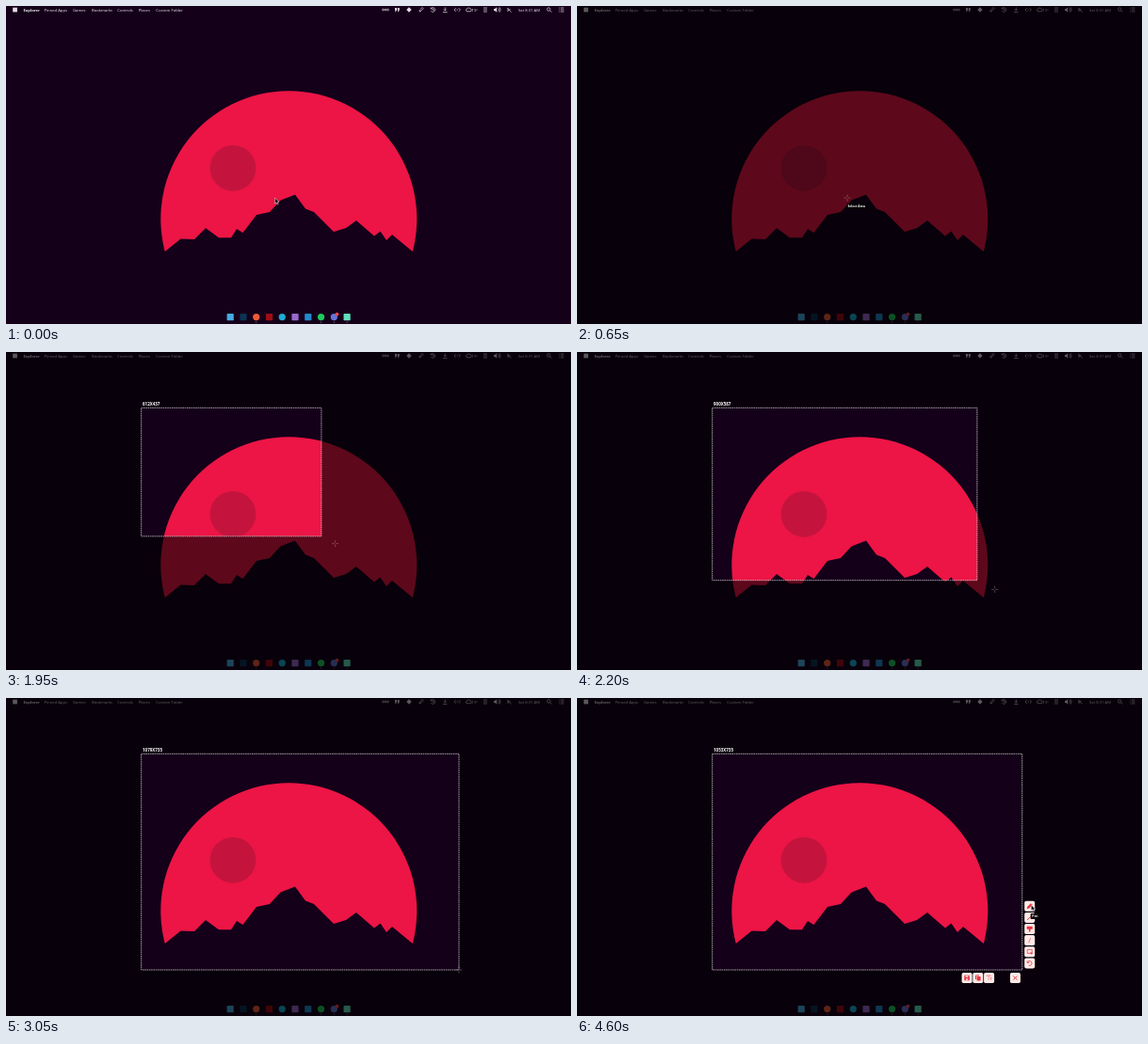
An HTML page that plays this animation: 600 by 338 pixels, repeating every 5 s.

```html
<!DOCTYPE html>
<html lang="en">
<head>
<meta charset="utf-8">
<title>Select an area</title>
<style>
html, body { margin: 0; width: 100%; height: 100%; overflow: hidden; background: #15001a; }
svg { display: block; width: 100vw; height: 100vh; }
text { font-family: "Open Sans", sans-serif; fill: #fff; }
.menu text { font-size: 4.2px; fill: #f0ecf1; }
.menu .app { font-weight: 700; }
.line { fill: none; stroke: #e4dde6; stroke-width: .7; }
.solid { fill: #e4dde6; }
.tip { font-size: 3.35px; font-weight: 700; }
.size { font-size: 4.5px; font-weight: 700; }
.tool { fill: #fdebe7; }
.ink { fill: none; stroke: #e8323f; stroke-width: 1; }
.full { fill: #e8323f; }
</style>
</head>
<body>
<svg viewBox="0 0 600 338" preserveAspectRatio="none">
  <rect width="600" height="338" fill="#15001a"/>
  <path fill="#ec1545" d="M168.8 261A136 136 0 1 1 431.8 261L410 243 404 249 397.500 239.500 391 244.500 372 228 361 236 348 240 327 219 318 215.500 307 200.500 291.500 206.500 280 219 266 222 251.500 241 245 237 239 246.300 226 246.300 212 236 200 248 185.500 247.500Z"/>
  <circle cx="241" cy="172.300" r="24.400" fill="#c4143e"/>

  <g class="menu">
    <rect class="solid" x="7.200" y="1.700" width="4.700" height="4.700"/>
    <g id="titles"></g>
    <g class="line">
      <circle cx="400.500" cy="4" r=".9"/><circle cx="403" cy="4" r=".9"/><circle cx="405.500" cy="4" r=".9"/>
      <path d="M439 6l.5-2 2.700-2.500 1 1L440.500 5.500Z"/>
      <path d="M451.500 2.700a2.300 2.300 0 1 1-.2 2.300M451.200 1.500v1.500h1.500M453.500 2.800v1.500h1.200"/>
      <path d="M466.300 1.500v3.500M464.800 3.500l1.500 1.500 1.500-1.500M464 6.500h4.600"/>
      <path d="M477.800 2.200l-1.800 1.800 1.800 1.800M480.700 2.200l1.800 1.800-1.800 1.800M478.500 4h1.500"/>
      <path d="M490 5.800a1.500 1.500 0 0 1 0-3 1.700 1.700 0 0 1 3 .2 1.400 1.400 0 0 1 0 2.800Z"/>
      <path d="M507 2h4M507 4h4M507 6h4"/>
      <path d="M522.800 2.300a2.500 2.500 0 0 1 0 3.400M524 1.300a4 4 0 0 1 0 5.400"/>
      <path d="M532.500 2l4 4.500M533 6v-3.500M535.500 3l-2 2"/>
      <circle cx="576.300" cy="3.500" r="1.700"/><path d="M577.600 4.800l1.800 1.800"/>
      <path d="M588.800 2h3.700M588.800 4h3.700M588.800 6h3.700M587.200 2h.7M587.200 4h.7M587.200 6h.7"/>
    </g>
    <path class="solid" d="M413 2h2v2.500l-1.200 1.800h-.6l.4-1.800H413ZM415.800 2h2v2.500l-1.200 1.800h-.6l.4-1.800h-.6ZM428 1.200l2.700 2.800-2.700 2.800-2.700-2.800ZM518 3h1.200l2-1.700v5.400l-2-1.700H518Z"/>
  </g>
  <g id="dock"></g>

  <path id="dim" fill="#000" fill-opacity=".6" fill-rule="evenodd"/>
  <g id="pick">
    <rect id="frame" x="143.700" y="59.300" fill="none" stroke="#d8d3da" stroke-width=".75" stroke-dasharray="1.600 .7"/>
    <text id="size" class="size" x="145" y="57"></text>
  </g>
  <g id="tools"></g>
  <g id="cross">
    <path d="M-3.500 0h2.700M.8 0h2.700M0-3.500v2.700M0 .8v2.700" fill="none" stroke="#b09ca6" stroke-width=".7" opacity=".6"/>
    <g id="hint">
      <rect x="-.3" y="6" width="19.800" height="5" fill="#000"/>
      <text class="tip" x=".5" y="9.800">Select Area</text>
    </g>
  </g>
  <g id="penTip">
    <rect x="481.700" y="229" width="9.300" height="6" rx=".6" fill="#0a0508"/>
    <text class="tip" x="483.300" y="233.300">Pen</text>
  </g>
  <path id="arrow" d="M0 0v6l1.400-1.200 1.100 2.200 1.100-.5L2.600 4.400l1.800-.2Z" fill="#120814" stroke="#f3eef3" stroke-width=".5"/>
</svg>
<script>
const $ = id => document.getElementById(id);
const LOOP = 5000, STEP = 50, SCALE = 3.2;
const LEFT = 143.7, TOP = 59.3;

const titles = [
  ["Explorer", 18.5, "app"], ["Pinned Apps", 40.5], ["Games", 71], ["Bookmarks", 91],
  ["Controls", 118.3], ["Places", 140.7], ["Custom Folder", 159.3],
  ["19°", 494.5], ["Sat 8:31 AM", 544]
];
$("titles").innerHTML = titles.map(([word, x, kind = ""]) =>
  `<text class="${kind}" x="${x}" y="5.6">${word}</text>`).join("");

// Dock: colour, round or square, running dot
const apps = [
  ["#46abe0", 0, 0], ["#0b3454", 0, 0], ["#ee5b38", 1, 1], ["#9e0c14", 0, 0], ["#1cadd6", 1, 0],
  ["#9868cc", 0, 0], ["#238acb", 0, 0], ["#1ecb5c", 1, 1], ["#6672d6", 1, 1], ["#62dfbd", 0, 1]
];
$("dock").innerHTML = apps.map(([color, round, open], i) => {
  const x = 238.2 + i * 13.77;
  return `<rect x="${x - 3.6}" y="327" width="7.2" height="7.2" rx="${round ? 3.6 : .8}" fill="${color}"/>` +
    (open ? `<circle cx="${x}" cy="335.9" r=".5" fill="#b9b0bc"/>` : "");
}).join("") + '<circle cx="351.5" cy="327.6" r="1.9" fill="#ef4550"/>';

// Toolbar: centre and icon drawn around it
const stroke = d => `<path class="ink" d="${d}"/>`;
const fill = d => `<path class="full" d="${d}"/>`;
const tools = [
  [480.7, 221.3, fill("M-3 3l.7-2.500L1.200-3 3-1.200-.5 2.300Z")],
  [480.7, 233.4, stroke("M-2.500 2.500l5-5")],
  [480.7, 245.5, fill("M-3-2.800h6v3h-2.200v2.800h-1.600V.2H-3Z")],
  [480.7, 257.6, `<g opacity=".6">${stroke("M-1 2.500L1-2.500")}</g>`],
  [480.7, 269.7, `<g opacity=".7">${stroke("M-2.500-2.300h5v4h-5Z")}</g>` + fill("M.5 0l2.700 1.600-1.300 1.400Z")],
  [480.7, 281.9, `<g opacity=".8">${stroke("M-2.500-2.500v2h2M-2.300-.7a2.400 2.400 0 1 1 1.300 3")}</g>`],
  [414.1, 297.5, fill("M-2.800-2.800H2L2.800-2v4.800h-5.600Z") + '<path fill="#fdebe7" d="M-1.500-2.200h2.800v1.400h-2.800ZM-1.200.8h2.400v1.500h-2.400Z"/>'],
  [425.8, 297.5, stroke("M-2.300 1.500v-4h3.500") + fill("M-1.200-1.500h4v4.500h-4Z")],
  [437.6, 297.5, `<g opacity=".45">${stroke("M-2.500-1.500v-1h4v1M-.5-2.500v5M1 0h2M2 0v2.500")}</g>`],
  [465.4, 297.5, stroke("M-2-2l4 4M2-2l-4 4")]
];
$("tools").innerHTML = tools.map(([x, y, icon]) =>
  `<g transform="translate(${x} ${y})"><rect class="tool" x="-5.5" y="-5.500" width="11" height="11" rx="1.800"/>${icon}</g>`).join("");

// Keys are [time, x, y]; drag keys hold the selection size in screen pixels
const approach = [[1100, 287, 204], [1250, 215, 130], [1400, 149, 62], [1600, 144, 59]];
const drag = [
  [1700, 0, 0], [1800, 190, 125], [1950, 612, 437], [2000, 659, 462], [2250, 960, 618],
  [2500, 1076, 693], [2550, 1082, 709], [2750, 1080, 735], [3300, 1079, 735], [3450, 1053, 735]
];
const leave = [[3900, 473, 290], [4100, 494, 301], [4400, 483, 280], [4550, 482.3, 220]];

function along(keys, t) {
  const n = keys.findIndex(k => k[0] > t);
  if (n === 0) return keys[0].slice(1);
  if (n < 0) return keys[keys.length - 1].slice(1);
  const [t0, x0, y0] = keys[n - 1], [t1, x1, y1] = keys[n];
  const p = (t - t0) / (t1 - t0);
  return [x0 + (x1 - x0) * p, y0 + (y1 - y0) * p];
}

const show = (id, on) => $(id).style.display = on ? "" : "none";
const move = (id, x, y) => $(id).setAttribute("transform", `translate(${x} ${y})`);

function draw(t) {
  const dimmed = t >= 600, dragging = t >= 1700, released = t >= 3600;
  const [w, h] = along(drag, t);
  const fw = w / SCALE, fh = h / SCALE;

  show("dim", dimmed);
  show("pick", dragging && w > 0);
  show("tools", released);
  show("cross", dimmed && !released);
  show("hint", !dragging);
  show("arrow", !dimmed || released);
  show("penTip", t >= 4600);

  $("dim").setAttribute("d", "M0 0H600V338H0Z" +
    (dragging ? `M${LEFT} ${TOP}h${fw}v${fh}h${-fw}Z` : ""));
  $("frame").setAttribute("width", fw);
  $("frame").setAttribute("height", fh);
  $("size").textContent = `${Math.round(w)}X${Math.round(h)}`;

  // The selection trails the pointer by one step
  const [aw, ah] = along(drag, t + STEP);
  const cross = dragging ? [LEFT + aw / SCALE, TOP + ah / SCALE] : along(approach, t);
  move("cross", ...cross);
  move("arrow", ...(released ? along(leave, t) : [285.6, 204]));
}

function tick() {
  const t = performance.now() % LOOP;
  draw(Math.floor(t / STEP) * STEP);
  requestAnimationFrame(tick);
}
tick();
</script>
</body>
</html>
```
